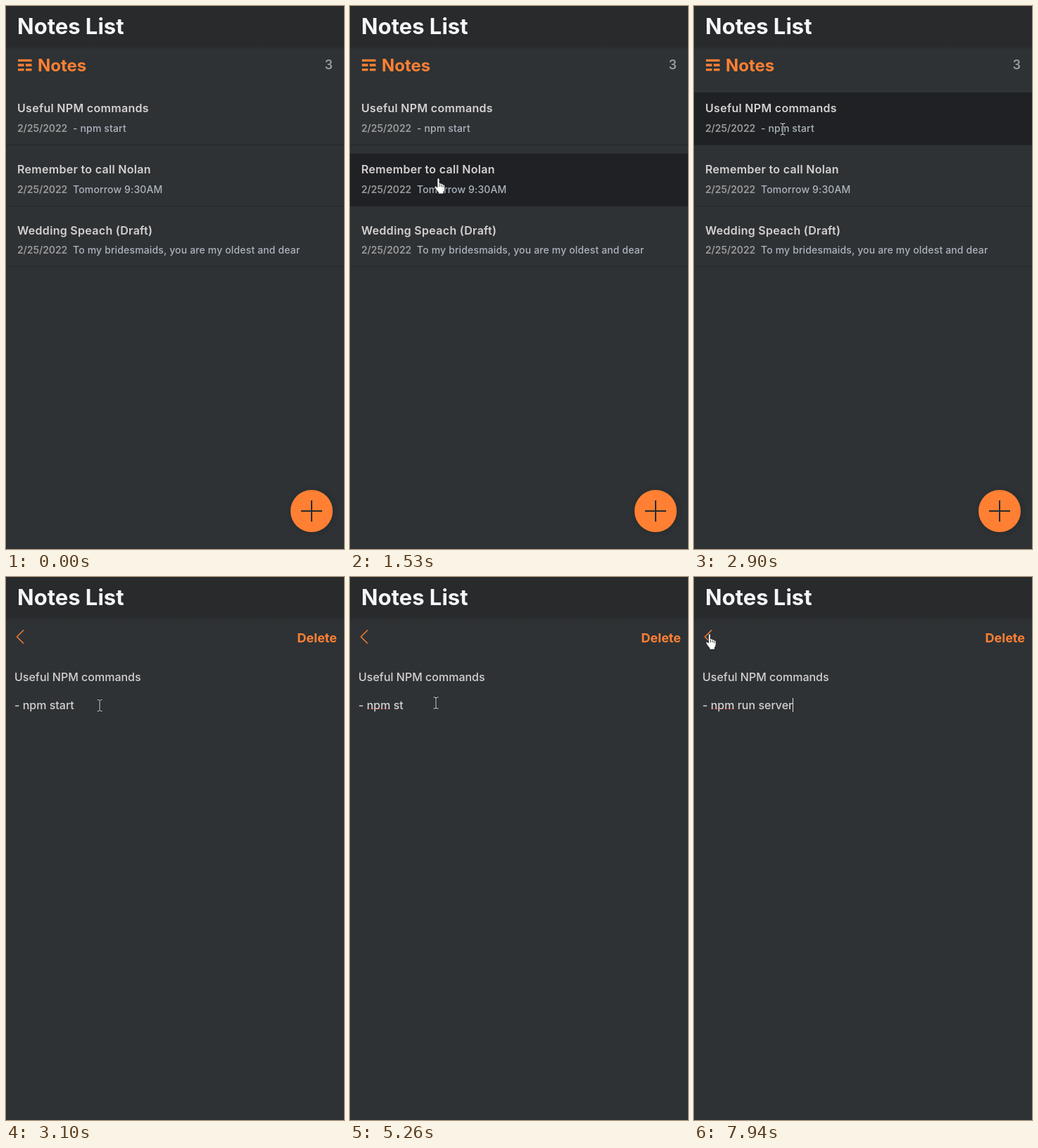
An HTML page that plays this animation: 480 px wide and 772 px high, repeating every 8 s.

```html
<!DOCTYPE html>
<html lang="en">
<head>
<meta charset="utf-8">
<title>Notes List</title>
<style>
  html, body { margin: 0; width: 100%; height: 100%; overflow: hidden; background: #2e3235; }
  #stage { position: relative; width: 480px; height: 772px; overflow: hidden; font-family: Inter, "Open Sans", sans-serif; }
  svg { position: absolute; left: 0; top: 0; width: 480px; height: 772px; }
  text { white-space: pre; }
  .head { font-size: 31px; font-weight: 700; fill: #f5f6f7; }
  .main { fill: #ff8033; font-weight: 700; }
  .title { font-size: 16px; font-weight: 600; letter-spacing: .3px; fill: #d6d1d1; }
  .date { font-size: 14px; font-weight: 600; letter-spacing: -.1px; fill: #999; }
  .text { font-size: 14px; font-weight: 500; letter-spacing: .15px; fill: #acb4bd; }
  #editor { position: absolute; left: 12px; top: 132px; font-size: 16px; font-weight: 500; line-height: 20px; color: #d6d1d1; }
  #editor div { height: 20px; white-space: pre; }
  #npm.marked { background: linear-gradient(#a32226, #a32226) 0 15px / 100% 1px no-repeat; }
  #editor #caret { position: absolute; width: 1px; background: #e2dfdf; }
</style>
</head>
<body>
<div id="stage">
  <svg viewBox="0 0 480 772">
    <defs>
      <linearGradient id="edge" x2="0" y2="1">
        <stop stop-color="#292a2c"/><stop offset="1" stop-color="#2e3235"/>
      </linearGradient>
      <filter id="soft" x="-30%" y="-30%" width="160%" height="160%"><feGaussianBlur stdDeviation="3"/></filter>
    </defs>
    <rect width="480" height="57" fill="#292a2c"/>
    <rect y="57" width="480" height="5" fill="url(#edge)"/>
    <text class="head" x="16" y="39.5">Notes List</text>

    <g id="list">
      <path d="M17 77.3h19.5M17 84h8.5m2.5 0h8.5M17 90.7h8.5m2.5 0h8.5" stroke="#ff8033" stroke-width="3.3"/>
      <text class="main" x="45" y="93" font-size="24">Notes</text>
      <text x="464" y="89.5" font-size="18" font-weight="600" fill="#999" text-anchor="end">3</text>
      <g id="rows"></g>
      <circle cx="435" cy="719" r="30" fill="#1f2124" opacity=".55" filter="url(#soft)"/>
      <circle cx="434" cy="718" r="30" fill="#ff8033"/>
      <path d="M419 718h30M434 703v30" stroke="#292a2c" stroke-width="2"/>
    </g>

    <g id="note">
      <path d="M25 75.5L15.5 85L25 94.5" fill="none" stroke="#ff8033" stroke-width="1.4"/>
      <text class="main" x="470" y="93" font-size="18" text-anchor="end">Delete</text>
    </g>
  </svg>

  <div id="editor">
    <div>Useful NPM commands</div>
    <div></div>
    <div>- <span id="npm">npm</span><span id="rest"></span></div>
    <div id="caret"></div>
  </div>

  <svg viewBox="0 0 480 772">
    <g id="arrow">
      <path d="M0 0V16.5L3.8 13L6.4 19L8.9 18L6.3 12H11.6Z" fill="#fff" stroke="#111" stroke-width=".8"/>
    </g>
    <g id="hand">
      <g transform="translate(-5.5 0)" stroke="#15171a" stroke-width=".8">
        <path d="M4 2Q5.5-.5 7 2V8Q9 7 9.5 9Q12 8 12 10Q14.7 9.5 14.7 12V16Q14.3 19 13 20V23H5.5V21Q2 17 .5 14Q0 12 1.5 12Q3 12.3 4 14Z" fill="#fff"/>
        <path d="M7 9v4M9.6 10v3M12.1 11v3" fill="none"/>
      </g>
    </g>
    <g id="beam" fill="none">
      <path d="M-3.5-8H-1L0-7L1-8H3.5M0-7V7M-3.5 8H-1L0 7L1 8H3.5" stroke="#17191b" stroke-width="2.6"/>
      <path d="M-3.5-8H-1L0-7L1-8H3.5M0-7V7M-3.5 8H-1L0 7L1 8H3.5" stroke="#e6e6e6"/>
    </g>
  </svg>
</div>

<script>
const LOOP = 8000, OPEN = 2970;
const $ = id => document.getElementById(id);
const show = (el, on) => { el.style.display = on ? "" : "none"; };

const notes = [
  ["Useful NPM commands", "- npm start"],
  ["Remember to call Nolan", "Tomorrow 9:30AM"],
  ["Wedding Speach (Draft)", "To my bridesmaids, you are my oldest and dear"]
];
const rowTop = i => 123 + 86.7 * i;
const at = (i, dy) => Math.round(rowTop(i) + dy);

$("rows").innerHTML = notes.map(([title, text], i) => `
  <rect id="row${i}" y="${at(i, 0)}" width="480" height="74" fill="#1f2124"/>
  <rect y="${at(i, 74)}" width="480" height="1" fill="#252629"/>
  <text class="title" x="16" y="${at(i, 28.3)}">${title}</text>
  <text class="date" x="16" y="${at(i, 56)}">2/25/2022</text>
  <text class="text" x="95" y="${at(i, 56)}">${text}</text>`).join("");

// Pointer path: time, x, y
const path = [
  [440, 330, 662], [640, 262, 560], [880, 178, 425], [1100, 134, 338], [1250, 130, 328],
  [1500, 125.5, 244], [1600, 125.5, 244], [1750, 126, 205], [1950, 126, 175],
  [2900, 126, 175], [3200, 140, 190], [3560, 138, 201], [3720, 133, 196],
  [3900, 130, 197], [4060, 130, 197], [4200, 125, 177], [4350, 122, 179],
  [6900, 122, 179], [6901, 76, 146], [7550, 76, 146], [7670, 20, 112],
  [7750, 6, 92], [7820, 14, 84], [7870, 22, 80]
];

// Text after "npm" in the open note
const typing = [
  [0, " start"], [4910, " star"], [5110, " sta"], [5260, " st"], [5390, " s"], [5460, " "],
  [5600, " r"], [5670, " ru"], [5800, " run"], [5930, " run "], [6050, " run s"],
  [6310, " run se"], [6380, " run ser"], [6580, " run serv"], [6780, " run serve"], [6850, " run server"]
];
const caretOn = [[3910, 4840], [4910, 5260], [5390, 7320], [7840, LOOP]];

const latest = (steps, t) => steps.filter(s => s[0] <= t).pop();

// The pointer was sampled about fifteen times a second
function pointer(t) {
  const q = 440 + Math.floor((t - 440) / 67) * 67;
  const a = latest(path, q) || path[0];
  const b = path[path.indexOf(a) + 1] || a;
  const k = a === b ? 0 : Math.max(0, (q - a[0]) / (b[0] - a[0]));
  return [a[1] + (b[1] - a[1]) * k, a[2] + (b[2] - a[2]) * k];
}

function draw(t) {
  const open = t >= OPEN;
  const [x, y] = pointer(t);
  show($("list"), !open);
  show($("note"), open);
  show($("editor"), open);

  let hover = -1;
  notes.forEach((_, i) => {
    const over = t >= 440 && y >= rowTop(i) && y < rowTop(i) + 75;
    if (over) hover = i;
    show($("row" + i), over);
  });

  let shape = "arrow";
  if (!open) shape = t >= 2830 ? "beam" : hover >= 0 ? "hand" : "arrow";
  else if (y > 128) shape = "beam";
  else if (x > 10 && y < 96) shape = "hand";
  for (const id of ["arrow", "hand", "beam"]) {
    show($(id), t >= 440 && id === shape);
    $(id).setAttribute("transform", `translate(${x.toFixed(1)} ${y.toFixed(1)})`);
  }

  if (!open) return;
  $("npm").className = t >= 3640 ? "marked" : "";
  const rest = $("rest");
  rest.textContent = latest(typing, t)[1];
  const below = t < 4310;
  const caret = $("caret");
  show(caret, caretOn.some(([from, to]) => t >= from && t < to));
  caret.style.left = (below ? 0 : Math.round(rest.offsetLeft + rest.offsetWidth)) + "px";
  caret.style.top = (below ? 60 : 40) + "px";
}

const start = performance.now();
function tick() {
  draw((performance.now() - start) % LOOP);
  requestAnimationFrame(tick);
}
tick();
</script>
</body>
</html>
```
